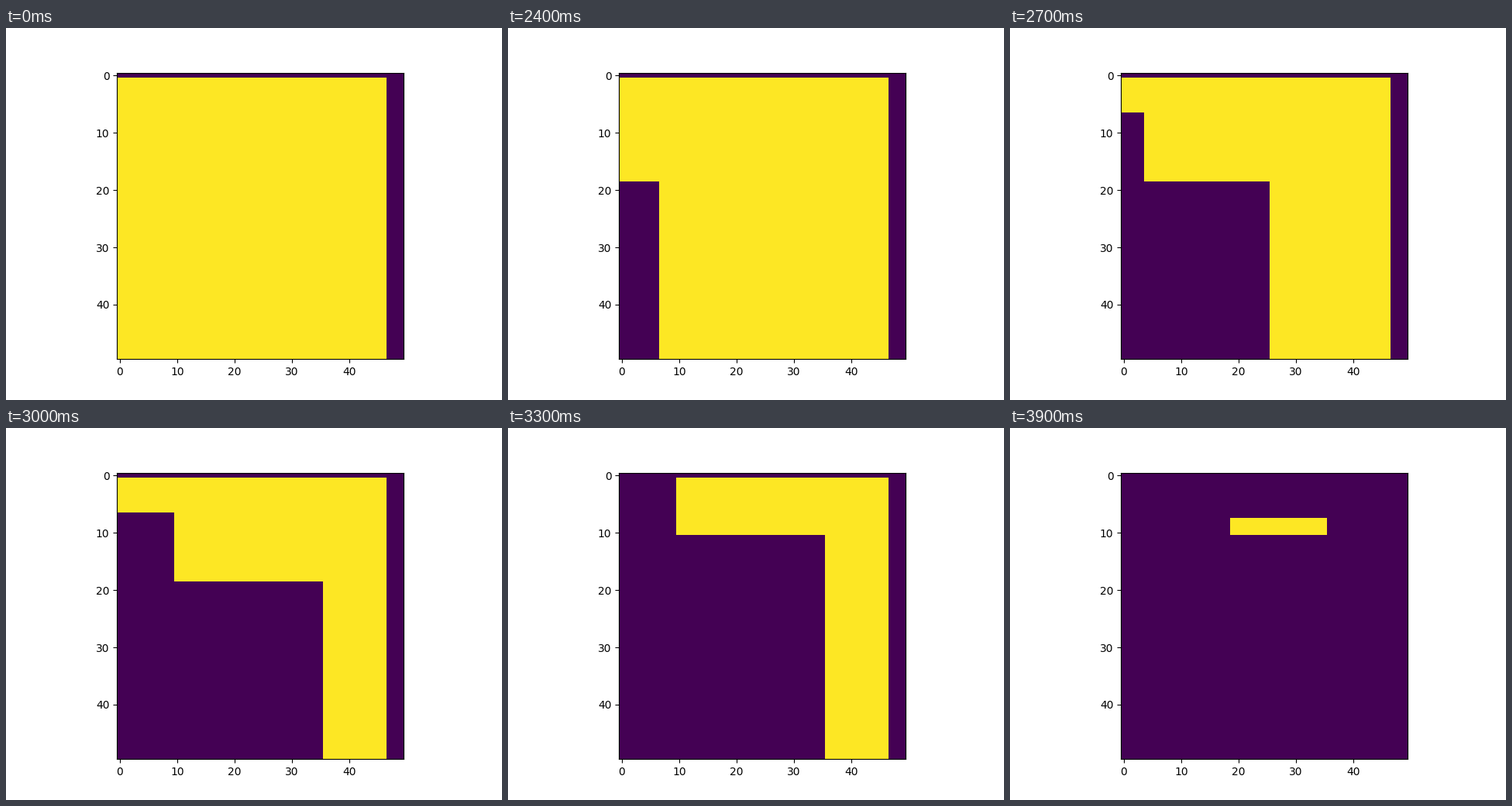
Animation, 640 px wide and 480 px high, one loop 4.5 s. Source, as a matplotlib script:

```python
import numpy as np
import matplotlib.pyplot as plt
from matplotlib.animation import FuncAnimation

SIZE = 50
FRAMES = 45
INTERVAL = 100


def glide(frame, times, values):
    """Whole-cell position on a straight path through key points."""
    return int(round(np.interp(frame, times, values)))


def lit_area(frame):
    if frame < 35:
        return slice(1, SIZE), slice(0, 47)
    return slice(8, 11), slice(10 if frame < 39 else 19, 36)


def grid(frame):
    cells = np.zeros((SIZE, SIZE))
    cells[lit_area(frame)] = 1

    # Two dark blocks grow rightwards, pause, then rise together
    wide = glide(frame, [22, 23, 26, 27, 28, 30], [0, 2, 17, 26, 26, 36])
    narrow = glide(frame, [26, 27, 28, 30], [0, 4, 4, 10])
    cells[glide(frame, [30, 33], [19, 11]):, :wide] = 0
    cells[glide(frame, [30, 33], [7, 1]):, :narrow] = 0
    return cells


fig, ax = plt.subplots(figsize=(6.4, 4.8), dpi=100)
image = ax.imshow(grid(0), cmap="viridis", vmin=0, vmax=1)


def update(frame):
    image.set_data(grid(frame))
    return (image,)


anim = FuncAnimation(fig, update, frames=FRAMES, interval=INTERVAL,
                     repeat=True, repeat_delay=0)
plt.show()
```
